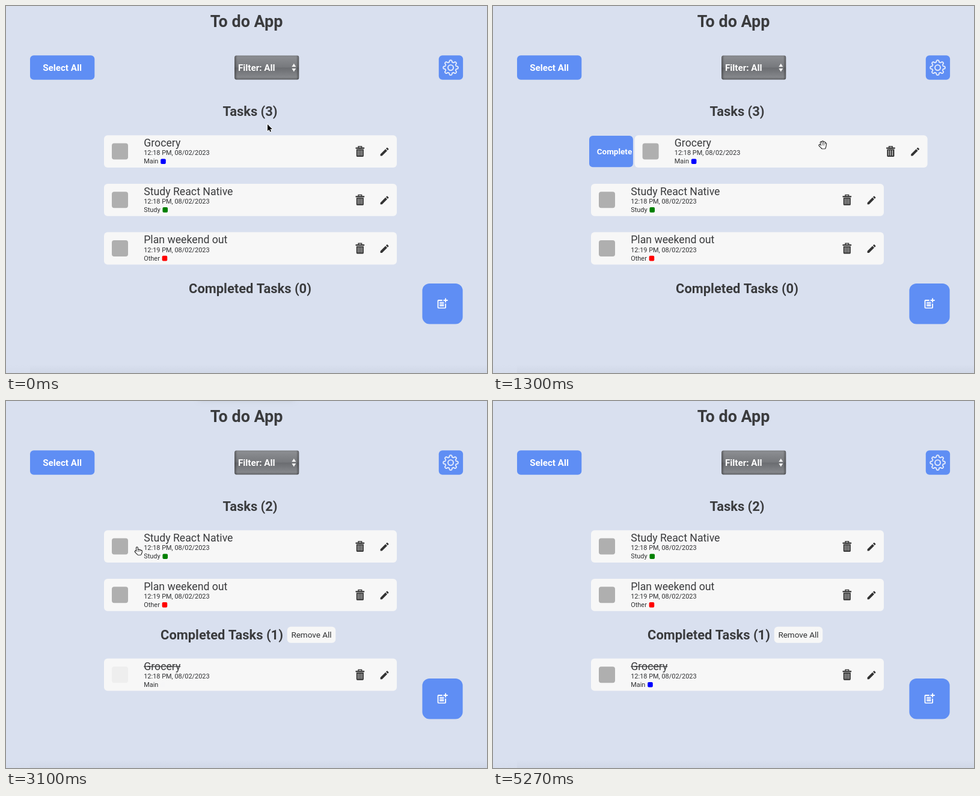
Recreate the animation shown at these times as an HTML page with a canvas. Size 800 by 611 pixels, loop 5830 ms.

```html
<!DOCTYPE html>
<html lang="en">
<head>
<meta charset="utf-8">
<title>To do App</title>
<style>
  html, body { margin: 0; width: 100%; height: 100%; overflow: hidden; background: #d9e0ef; }
  canvas { display: block; width: 800px; height: 611px; }
</style>
</head>
<body>
<canvas id="stage"></canvas>
<script>
const LOOP = 5830, W = 800, H = 611;
const BG = '#d9e0ef', BLUE = '#5f8ef4', INK = '#3a3b3d', CARD = '#f7f7f7', GREY = '#afafaf';
const DONE_AT = 3100;

const canvas = document.getElementById('stage');
const ctx = canvas.getContext('2d');
const ratio = window.devicePixelRatio || 1;
canvas.width = Math.round(W * ratio);
canvas.height = Math.round(H * ratio);

const PENCIL = new Path2D('M3 17.25V21h3.75L17.81 9.94l-3.75-3.75L3 17.25zM20.71 7.04a1 1 0 0 0 0-1.41l-2.34-2.34a1 1 0 0 0-1.41 0l-1.83 1.83 3.75 3.75 1.83-1.83z');
const NOTE = new Path2D('M17 19.2H5V7h7V5H5C3.9 5 3 5.9 3 7v12c0 1.1.9 2 2 2h12c1.1 0 2-.9 2-2v-7h-2zM19 2h-2v3h-3v2h3v3h2V7h3V5h-3zM7 9h8v2H7zM7 12h8v2H7zM7 15h8v2H7z');

const clamp = (v, a = 0, b = 1) => Math.min(b, Math.max(a, v));
const mix = (a, b, p) => a + (b - a) * p;

const linear = p => p;
const outQuad = p => 1 - (1 - p) * (1 - p);
const inOut = p => p * p * (3 - 2 * p);

function bezier(x1, y1, x2, y2) {
  const at = (a, b, s) => 3 * a * s * (1 - s) ** 2 + 3 * b * s * s * (1 - s) + s ** 3;
  return p => {
    if (p <= 0 || p >= 1) return clamp(p);
    let lo = 0, hi = 1;
    for (let i = 0; i < 24; i++) {
      const mid = (lo + hi) / 2;
      if (at(x1, x2, mid) < p) lo = mid; else hi = mid;
    }
    return at(y1, y2, lo);
  };
}
const enterEase = bezier(.21, 1.02, .73, 1);
const exitEase = bezier(.06, .71, .55, 1);
const popEase = bezier(.175, .885, .32, 1.275);

// Keys are [time, ease into this key, ...values].
function track(keys, t) {
  let i = 0;
  while (i < keys.length - 1 && t >= keys[i + 1][0]) i++;
  const a = keys[i], b = keys[i + 1];
  if (!b || t <= a[0]) return a.slice(2);
  const p = b[1]((t - a[0]) / (b[0] - a[0]));
  return a.slice(2).map((v, k) => mix(v, b[k + 2], p));
}

const POINTER = [
  [30, linear, 435, 197], [400, inOut, 440, 235], [655, linear, 440, 235],
  [730, linear, 471, 234], [1240, outQuad, 546, 231.5], [1300, linear, 548.5, 231.5],
  [1400, linear, 550, 232], [1830, inOut, 223, 249], [2000, outQuad, 220.5, 250],
  [3970, linear, 220.5, 250], [4530, inOut, 502, 268], [4630, outQuad, 508, 268]
];
const SWIPE = [
  [655, linear, 0], [730, linear, 28.5], [1230, outQuad, 70], [1300, linear, 72.5], [1500, outQuad, 84]
];

function box(x, y, w, h, r, fill) {
  ctx.fillStyle = fill;
  ctx.beginPath();
  ctx.roundRect(x, y, w, h, r);
  ctx.fill();
}

function label(text, x, y, size, { bold = false, color = INK, align = 'left' } = {}) {
  ctx.font = `${bold ? 700 : 400} ${size}px Roboto, Arial, sans-serif`;
  ctx.textAlign = align;
  ctx.fillStyle = color;
  ctx.fillText(text, x, y);
  return ctx.measureText(text).width;
}

const heading = (text, x, y, size = 21.9) => label(text, x, y, size, { bold: true, align: 'center' });

function shape(points) {
  ctx.beginPath();
  points.forEach(([x, y]) => ctx.lineTo(x, y));
  ctx.closePath();
}

function at(x, y, draw, scale = 1) {
  ctx.save();
  ctx.translate(x, y);
  ctx.scale(scale, scale);
  draw();
  ctx.restore();
}

function trash() {
  ctx.strokeStyle = ctx.fillStyle = '#333';
  ctx.lineWidth = 1.4;
  ctx.strokeRect(-2.8, -8.3, 5.6, 3);
  ctx.fillRect(-7.3, -6.6, 14.6, 2.2);
  box(-6, -3.6, 12, 12.6, [0, 0, 1.6, 1.6], '#333');
  ctx.fillStyle = CARD;
  for (const x of [-3.6, -.5, 2.6]) ctx.fillRect(x, -2, 1, 9);
}

function gear() {
  ctx.strokeStyle = '#e4ebfb';
  ctx.lineWidth = 1.9;
  ctx.lineJoin = 'round';
  ctx.beginPath();
  for (let i = 0; i < 192; i++) {
    const a = i / 192 * Math.PI * 2;
    const r = 10.8 + 1.6 * Math.tanh(2 * Math.cos(8 * a));
    ctx.lineTo(r * Math.cos(a), r * Math.sin(a));
  }
  ctx.closePath();
  ctx.stroke();
  ctx.beginPath();
  ctx.arc(0, 0, 4.5, 0, Math.PI * 2);
  ctx.stroke();
}

function filterBox() {
  const x = 380, y = 82.3, w = 107.5, h = 40.5;
  ctx.save();
  ctx.beginPath();
  ctx.roundRect(x, y, w, h, 4);
  ctx.clip();
  const down = ctx.createLinearGradient(0, y, 0, y + h);
  down.addColorStop(0, '#75777a');
  down.addColorStop(.06, '#8b8d91');
  down.addColorStop(.48, '#77797d');
  down.addColorStop(.52, '#6b6d71');
  down.addColorStop(.9, '#85878b');
  down.addColorStop(1, '#5b5d60');
  ctx.fillStyle = down;
  ctx.fillRect(x, y, w, h);
  const side = ctx.createLinearGradient(x, 0, x + w, 0);
  side.addColorStop(0, 'rgba(30,30,32,.45)');
  side.addColorStop(.045, 'rgba(30,30,32,0)');
  side.addColorStop(.955, 'rgba(30,30,32,0)');
  side.addColorStop(1, 'rgba(30,30,32,.45)');
  ctx.fillStyle = side;
  ctx.fillRect(x, y, w, h);
  ctx.restore();
  label('Filter: All', 386, 107.8, 15.17, { bold: true, color: '#fff' });
  ctx.fillStyle = '#f2f2f2';
  shape([[475.3, 101.3], [478.8, 95.8], [482.3, 101.3]]);
  ctx.fill();
  shape([[475.3, 104], [478.8, 109.5], [482.3, 104]]);
  ctx.fill();
}

function card(task, y, dx = 0, fade = 1, tagFade = 1) {
  const x = 163 + dx;
  box(x, y, 487, 53.8, 6, CARD);
  ctx.globalAlpha = fade;
  box(x + 13, y + 13.4, 27, 27, 4, GREY);
  ctx.globalAlpha = 1;
  const tx = x + 66.2;
  const width = label(task.name, tx, y + 18.8, 17.7);
  if (task.done) ctx.fillRect(tx, y + 12.6, width, 1.3);
  label(task.time + ', 08/02/2023', tx, y + 33.2, 10.95, { color: '#303133' });
  const tag = label(task.tag, tx, y + 47.2, 10.95, { color: '#303133' });
  ctx.globalAlpha = tagFade;
  box(tx + tag + 3.8, y + 39.2, 8.6, 8.6, 2, task.color);
  ctx.globalAlpha = 1;
  at(x + 425.8, y + 26.9, trash);
  at(x + 457.3, y + 18.2, () => { ctx.fillStyle = '#333'; ctx.fill(PENCIL); }, .77);
}

const grocery = { name: 'Grocery', time: '12:18 PM', tag: 'Main', color: '#00f' };
const study = { name: 'Study React Native', time: '12:18 PM', tag: 'Study', color: '#008000' };
const plan = { name: 'Plan weekend out', time: '12:19 PM', tag: 'Other', color: '#f00' };

function openTasks(t) {
  const [dx] = track(SWIPE, t);
  heading('Tasks (3)', 406, 183.3);
  if (dx > 0) {
    ctx.save();
    ctx.beginPath();
    ctx.roundRect(160, 216, dx + .3, 52.2, 6);
    ctx.clip();
    ctx.fillStyle = BLUE;
    ctx.fillRect(160, 216, dx + 1, 53);
    label('Complete', 172.7, 247, 13.5, { bold: true, color: '#fff' });
    ctx.restore();
  }
  card(grocery, 215.2, dx);
  card(study, 295.9);
  card(plan, 376.6);
  heading('Completed Tasks (0)', 406, 477.5);
}

function doneTasks(t) {
  heading('Tasks (2)', 406, 183.3);
  card(study, 215.2);
  card(plan, 295.9);
  heading('Completed Tasks (1)', 359, 396.8);
  box(467.7, 375.8, 80.5, 27, 6, CARD);
  label('Remove All', 508, 394, 13.5, { align: 'center', color: '#303133' });
  const fade = clamp((t - 3065) / 300);
  card({ ...grocery, done: true }, 428.8, 0, fade, clamp((t - DONE_AT) / 270));
}

function toast(t) {
  const start = 3055, leave = 4850;
  if (t < DONE_AT || t >= leave + 400) return;
  const entering = t < leave;
  const p = entering ? enterEase((t - start) / 350) : 1 - exitEase((t - leave) / 400);
  const travel = entering ? 108 : 81;
  ctx.globalAlpha = entering ? mix(.5, 1, p) : p;
  at(400, 37 - travel * (1 - p), () => {
    ctx.save();
    ctx.shadowColor = 'rgba(0,0,0,.13)';
    ctx.shadowBlur = 9 * ratio;
    ctx.shadowOffsetY = 2.6 * ratio;
    box(-103.2, -27, 206.4, 54, 6.8, '#fff');
    ctx.restore();
    box(-103.2, -27, 206.4, 54, 6.8, '#fbfbfb');
    label('Task updated correctly!', -70, 5.4, 15.17, { color: '#363636' });
    const age = t - start;
    const pop = popEase(clamp((age - 100) / 300));
    if (pop > 0) at(-86.5, 0, () => {
      box(-8.5, -8.5, 17, 17, 8.5, '#61d345');
      if (age < 300) return;
      ctx.strokeStyle = '#fff';
      ctx.lineWidth = 1.8;
      ctx.beginPath();
      ctx.moveTo(-3.6, .3);
      ctx.lineTo(-1.1, 2.8);
      ctx.lineTo(3.6, -2.7);
      ctx.stroke();
    }, pop);
  }, mix(.6, 1, p));
  ctx.globalAlpha = 1;
}

function arrow() {
  shape([[0, 0], [0, 11], [2.6, 8.7], [4.3, 12.5], [6, 11.7], [4.4, 8], [7.8, 8]]);
  ctx.strokeStyle = '#fff';
  ctx.lineWidth = 1.6;
  ctx.stroke();
  ctx.fillStyle = '#000';
  ctx.fill();
}

// Each finger is [tip x, tip y, root x, root y].
const OPEN = [[-2.9, -4.4, -1.9, 1], [-.2, -5.3, 0, 1], [2.4, -4.5, 2.2, 1], [4.9, -2.3, 3.8, 2.5], [-5.2, .4, -2.2, 3.6]];
const POINT = [[-2.6, -5.6, -2.4, 1], [0, -1.7, 0, 1], [2.3, -1.2, 2.3, 1], [4.5, -.2, 4.2, 2.5], [-5, .5, -2.2, 3.6]];

function hand(fingers) {
  ctx.lineCap = ctx.lineJoin = 'round';
  for (const [color, width] of [['#000', 3.7], ['#fff', 1.8]]) {
    ctx.strokeStyle = ctx.fillStyle = color;
    ctx.lineWidth = width;
    for (const [x1, y1, x2, y2] of fingers) {
      ctx.beginPath();
      ctx.moveTo(x1, y1);
      ctx.lineTo(x2, y2);
      ctx.stroke();
    }
    shape([[-2.4, 2], [4, 2], [3.2, 5], [-.8, 5]]);
    ctx.stroke();
    ctx.fill();
  }
}

function cursor(t) {
  if (t >= 5070) return;
  const [x, y] = track(POINTER, t);
  const pointing = t > 1500 && t < 4000 && x < 244;
  at(x, y, () => y < 215 ? arrow() : hand(pointing ? POINT : OPEN));
}

function bottomShade() {
  for (const [x, w, a] of [[0, W, .025], [40, W - 40, .035]]) {
    const g = ctx.createLinearGradient(0, 597, 0, H);
    g.addColorStop(0, 'rgba(60,70,90,0)');
    g.addColorStop(1, `rgba(60,70,90,${a})`);
    ctx.fillStyle = g;
    ctx.fillRect(x, 597, w, 14);
  }
}

function draw(t) {
  ctx.setTransform(ratio, 0, 0, ratio, 0, 0);
  ctx.fillStyle = BG;
  ctx.fillRect(0, 0, W, H);
  bottomShade();
  heading('To do App', 400, 35.3, 26.9);
  box(40, 82.3, 107.3, 40.5, 6, BLUE);
  label('Select All', 93.6, 107.8, 15.17, { bold: true, color: '#fff', align: 'center' });
  filterBox();
  box(719.8, 82.3, 40.3, 40.5, 6, BLUE);
  at(739.6, 102.6, gear);
  if (t < DONE_AT) openTasks(t); else doneTasks(t);
  box(692.4, 462, 67.2, 67.5, 12, BLUE);
  at(714.9, 484.6, () => { ctx.fillStyle = '#fff'; ctx.fill(NOTE); }, .9);
  toast(t);
  cursor(t);
}

const begin = performance.now();
function frame() {
  draw((performance.now() - begin) % LOOP);
  requestAnimationFrame(frame);
}
frame();
</script>
</body>
</html>
```
